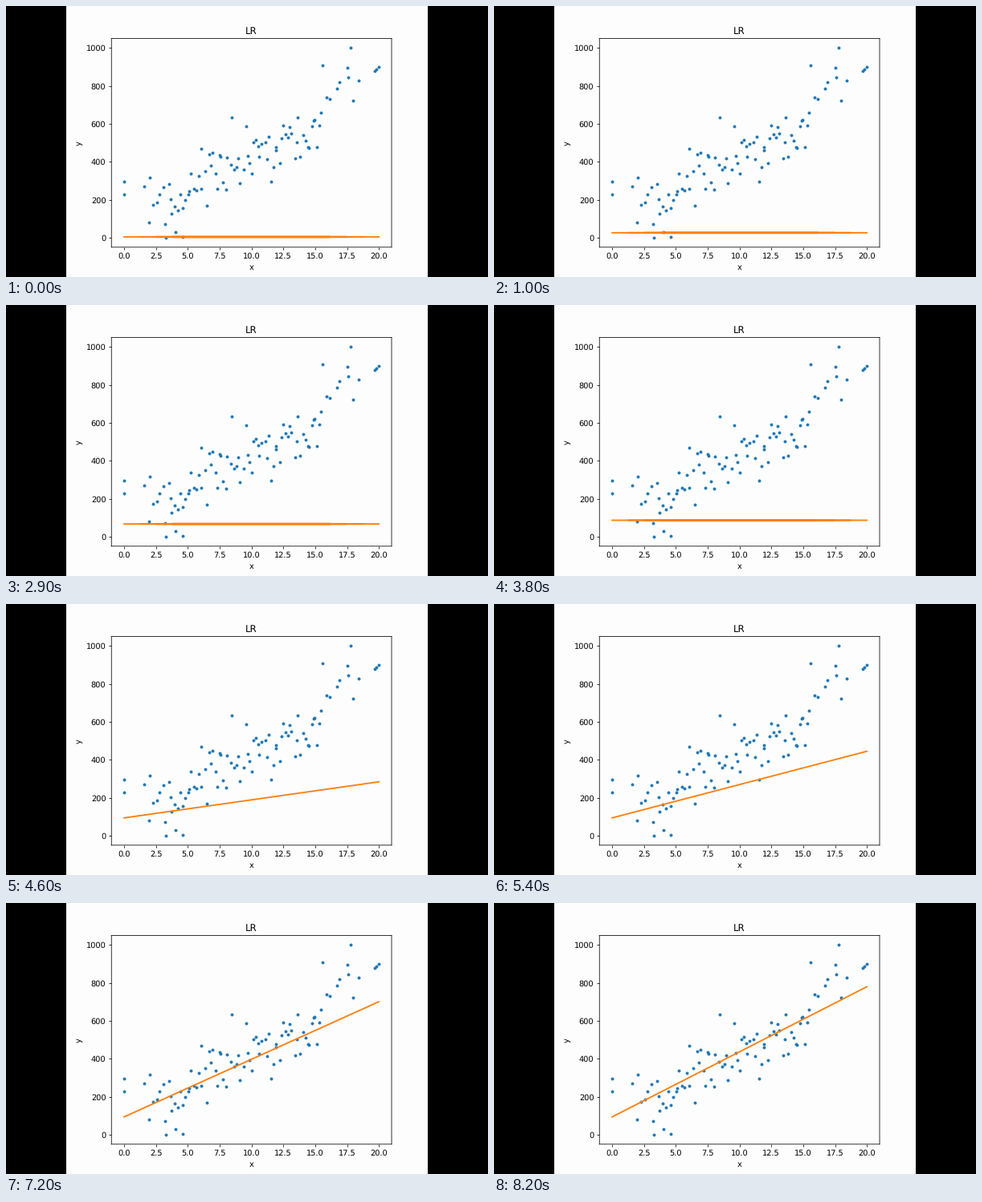
These frames come from a looping animation (600 px wide and 338 px high, 8300 ms). A matplotlib script:

```python
import numpy as np
import matplotlib.pyplot as plt
from matplotlib.animation import FuncAnimation
from matplotlib.patches import Rectangle

WIDTH, HEIGHT = 600, 338
DPI = 70.3125
FRAMES, INTERVAL = 83, 100
PAPER = "#fdfdfd"

SLOPE_START = 38
FINAL_SLOPE = 34.3


def make_samples(count=88, spread=88, seed=12):
    """Noisy rising cloud, densest around x = 10, plus its extreme points."""
    rng = np.random.default_rng(seed)
    rank = (np.arange(count) + rng.uniform(0, 1, count)) / count
    x = np.interp(rank, [0, 0.08, 0.5, 0.92, 1], [1.5, 3.2, 9.4, 15.6, 18.5])
    trend = np.interp(x, [1.5, 4, 9, 14, 18.5], [220, 190, 430, 530, 830])
    y = np.clip(trend + rng.normal(0, spread, count), 30, 900)
    extremes = [(0, 228), (0, 296), (3.3, 1), (4.59, 4), (15.57, 909),
                (17.5, 894), (17.78, 1000), (19.65, 881), (19.77, 886),
                (20, 902)]
    return np.vstack([np.column_stack([x, y]), extremes]).T


def fit_params(step):
    """Intercept climbs first, then the slope eases towards its final value."""
    intercept = min(4.3 + 2.17 * step, 94)
    u = max(0, (step - SLOPE_START) / (FRAMES - 1 - SLOPE_START))
    slope = FINAL_SLOPE * u * (1 + 0.64 * (1 - u))
    return intercept, slope


plt.rcParams["font.family"] = "DejaVu Sans"
plt.rcParams["text.hinting"] = "no_hinting"

# The tiny surplus guards against rounding down to one pixel less.
fig = plt.figure(figsize=((WIDTH + 1e-6) / DPI, (HEIGHT + 1e-6) / DPI),
                 dpi=DPI, facecolor="black")
fig.add_artist(Rectangle((75 / WIDTH, 0), 450 / WIDTH, 1, facecolor=PAPER,
                         edgecolor="none", transform=fig.transFigure,
                         zorder=-1))

ax = fig.add_subplot(facecolor=PAPER)
fig.subplots_adjust(left=131.25 / WIDTH, right=480 / WIDTH,
                    bottom=0.11, top=0.88)
ax.set(title="LR", xlabel="x", ylabel="y", xlim=(-1, 21), ylim=(-50, 1050))
for spine in ax.spines.values():
    spine.set_snap(False)

ax.plot(*make_samples(), ".", color="C0", snap=False)

# Nested strokes make the flat line swell towards its middle.
strokes = [ax.plot([], [], color="C1", lw=1.9 + 0.3 * level, snap=False)[0]
           for level in range(4)]


def update(step):
    intercept, slope = fit_params(step)
    for level, stroke in enumerate(strokes):
        x = np.array([1.3 * level, 20 - 1.3 * level])
        stroke.set_data(x, intercept + slope * x)
        stroke.set_visible(level == 0 or slope == 0)
    return strokes


anim = FuncAnimation(fig, update, frames=FRAMES, interval=INTERVAL,
                     repeat=True, repeat_delay=0)
plt.show()
```
